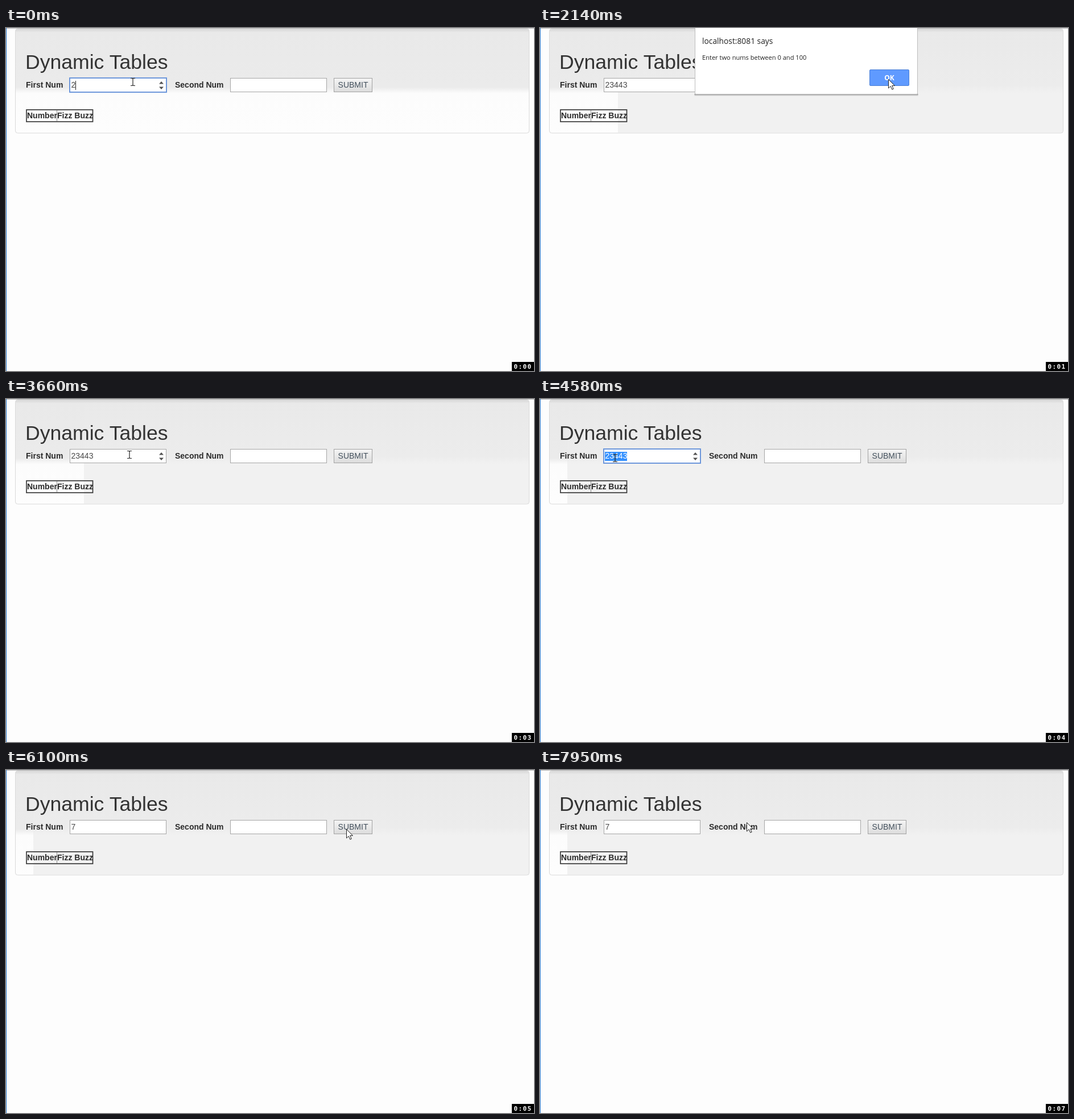
An HTML page for the animation above (8 s loop, 928 by 604 pixels).

```html
<!DOCTYPE html>
<html lang="en">
<head>
<meta charset="utf-8">
<title>Dynamic Tables</title>
<style>
  html, body { margin: 0; width: 100%; height: 100%; overflow: hidden; background: #fdfdfd; }
  svg { display: block; width: 928px; height: 604px; font-family: "Liberation Sans", Arial, sans-serif; font-size: 14px; }
  text { white-space: pre; }
  .bold { font-weight: 700; fill: #2b2b2b; }
  .field { fill: #fff; stroke: #a6a6a6; }
  .value { fill: #484848; }
  .spin { fill: #505050; }
  .dialog { font-family: "Open Sans", "Noto Sans", sans-serif; }
  .clock { font: 700 11px "DejaVu Sans Mono", monospace; letter-spacing: 1.4px; fill: #fff; }
</style>
</head>
<body>
<svg viewBox="0 0 928 604">
  <defs>
    <linearGradient id="light" gradientUnits="userSpaceOnUse" x1="0" y1="1" x2="0" y2="185">
      <stop offset="0" stop-color="#e9e9e9"/><stop offset=".56" stop-color="#ebebeb"/>
      <stop offset=".62" stop-color="#fcfcfc"/><stop offset="1" stop-color="#fdfdfd"/>
    </linearGradient>
    <linearGradient id="gray" gradientUnits="userSpaceOnUse" x1="0" y1="1" x2="0" y2="185">
      <stop offset="0" stop-color="#e9e9e9"/><stop offset=".54" stop-color="#ececec"/>
      <stop offset=".62" stop-color="#f1f1f1"/><stop offset="1" stop-color="#f1f1f1"/>
    </linearGradient>
    <linearGradient id="inset" x2="0" y2="1">
      <stop offset="0" stop-opacity=".07"/><stop offset="1" stop-opacity="0"/>
    </linearGradient>
    <linearGradient id="button" x2="0" y2="1">
      <stop offset="0" stop-color="#f5f5f5"/><stop offset="1" stop-color="#dcdcdc"/>
    </linearGradient>
    <linearGradient id="glow" x2="0" y2="1">
      <stop offset="0" stop-color="#fcfcfc" stop-opacity="0"/><stop offset=".45" stop-color="#fcfcfc"/>
    </linearGradient>
    <linearGradient id="shadow" x2="0" y2="1">
      <stop offset="0" stop-opacity=".45"/><stop offset="1" stop-opacity="0"/>
    </linearGradient>
    <path id="arrows" class="spin" d="M-4 98.500l4-4.500 4 4.500zM-4 103.500l4 4.500 4-4.500z"/>
  </defs>

  <rect width="928" height="604" fill="#fdfdfd"/>
  <rect x="16.500" y="1.500" width="903" height="183.500" rx="4" fill="url(#light)"/>
  <rect id="tint" y="2" height="182.500" fill="url(#gray)"/>
  <rect id="ghost" x="272" y="74" width="392" height="27" fill="url(#glow)"/>
  <rect x="17" y="2" width="902" height="6" fill="url(#inset)"/>
  <rect x="16.500" y="1.500" width="903" height="183.500" rx="4" fill="none" stroke="#dadada"/>
  <rect width="928" height="1" fill="#b4b4b4"/>
  <rect width="1" height="604" fill="#2b7cd3"/>

  <text x="34" y="72" font-size="35.600" fill="#333">Dynamic Tables</text>
  <text class="bold" x="35" y="105">First Num</text>
  <text class="bold" x="297" y="105">Second Num</text>

  <rect class="field" x="112.500" y="88.500" width="169" height="24"/>
  <rect id="focus" x="112" y="88" width="170" height="25" fill="none" stroke="#6d97db" stroke-width="2"/>
  <rect id="selection" x="114" y="93" width="39" height="16" fill="#3390ff"/>
  <text id="value" class="value" x="114.500" y="105"></text>
  <rect id="caret" y="93" width="1" height="16" fill="#222"/>
  <use id="spin1" href="#arrows" x="273"/>

  <rect class="field" x="394.500" y="88.500" width="169" height="24"/>
  <use id="spin2" href="#arrows" x="554"/>

  <rect x="576.500" y="88.500" width="67" height="24" fill="url(#button)" stroke="#a2a2a2"/>
  <text x="610" y="105" text-anchor="middle" fill="#43505c">SUBMIT</text>

  <rect x="36" y="144" width="116.500" height="21" fill="none" stroke="#3a3a3a" stroke-width="1.700"/>
  <path d="M89.500 145v19" stroke="#888"/>
  <text class="bold" x="37" y="159">Number</text>
  <text class="bold" x="90" y="159">Fizz Buzz</text>

  <g id="dialog" class="dialog">
    <rect x="271.500" y="116" width="393" height="4" fill="url(#shadow)"/>
    <path d="M272.500-30V115q0 1.500 1.500 1.500H662q1.500 0 1.500-1.500V-30z" fill="#fff" stroke="#bdbdbd"/>
    <text x="285" y="27.500" font-size="13.800" fill="#222">localhost:8081 says</text>
    <text x="285" y="56" font-size="11.100" fill="#222">Enter two nums between 0 and 100</text>
    <rect x="579.500" y="73.500" width="69" height="28" rx="1.500" fill="#5f9aff" stroke="#4a7fd6"/>
    <text x="614" y="91.500" font-size="12" font-weight="700" fill="#fff" text-anchor="middle">OK</text>
  </g>

  <rect x="889" y="588" width="39" height="16" fill="#000"/>
  <text id="clock" class="clock" x="892.500" y="600"></text>

  <path id="arrow" d="M.5.5V16l3.700-3.500 2.600 5.800 2.400-1.100-2.500-5.600H11.500z" fill="#fff" stroke="#222"/>
  <path id="beam" d="M-4-6.500h3l1 1 1-1h3M0-5.500v11M-4 6.500h3l1-1 1 1h3" fill="none" stroke="#222" stroke-width="1.200"/>
</svg>
<script>
const LOOP = 8000;
const TICK = 185;      // the clock turns this long after each full second
const KEY_GAP = 130;   // between key presses
const FADE = 150;

const el = id => document.getElementById(id);
const set = (id, attrs) => {
  for (const name in attrs) el(id).setAttribute(name, attrs[name]);
};
const show = (id, on) => set(id, { visibility: on ? "visible" : "hidden" });
const within = (v, from, to) => v >= from && v < to;
const clamp = (v, low, high) => Math.min(high, Math.max(low, v));
const ease = k => k * k * (3 - 2 * k);

// Each round: type a number, submit it, dismiss the alert.
const rounds = [
  { type: 0, text: "23443", open: 1340, close: 2450 },
  { type: 4590, text: "7", open: 6170, close: 7800 }
];
const drag = { from: 3750, to: 4020 };

const startPoint = { x: 223, y: 95 };
const moves = [
  { from: 680, to: 1190, x: 601, y: 105 },   // submit
  { from: 1340, to: 1900, x: 612, y: 90 },   // OK
  { from: 2290, to: 2450, x: 386, y: 95 },
  { from: 3050, to: 3640, x: 217, y: 98 },   // first field
  { ...drag, x: 48, y: 97 },
  { from: 4300, to: 5400, x: 565, y: 142 },
  { from: 5550, to: 5950, x: 598, y: 104 },  // submit
  { from: 6500, to: 7060, x: 632, y: 91 },   // OK
  { from: 7080, to: 7430, x: 606, y: 83 },
  { from: 7500, to: 7950, x: 363, y: 92 }
];

function pointerAt(t) {
  let { x, y } = startPoint;
  for (const move of moves) {
    const k = ease(clamp((t - move.from) / (move.to - move.from), 0, 1));
    x += (move.x - x) * k;
    y += (move.y - y) * k;
  }
  return [Math.round(x), Math.round(y)];
}

function draw(t) {
  const round = rounds.filter(r => r.type <= t).pop();
  const keys = 1 + Math.max(0, Math.floor((t - round.type - FADE) / KEY_GAP));
  const value = round.text.slice(0, keys);
  const alertOpen = within(t, round.open, round.close);
  const fading = within(t, round.close, round.close + FADE);

  const [x, y] = pointerAt(t);
  const overField = left => within(x, left, left + 170) && within(y, 88, 113);
  const overFirst = overField(112);
  const overSecond = overField(394);
  const dragging = within(t, drag.from, drag.to);
  const selected = within(t, drag.from + KEY_GAP, rounds[1].type);
  const focused = t < round.open - FADE || within(t, drag.from, rounds[1].type);
  const beam = !alertOpen && (overFirst || overSecond || dragging);

  // The shaded part of the panel changes with the clock.
  const seconds = Math.max(0, Math.floor((t - TICK) / 1000));
  const left = seconds < 4 ? 137 : 48;
  const right = seconds % 4 === 2 ? 269 : 919;
  set("tint", { x: left, width: seconds ? right - left : 0 });
  el("clock").textContent = "0:0" + seconds;

  el("value").textContent = value;
  el("value").style.fill = selected ? "#fff" : "";
  show("focus", focused);
  show("selection", selected);
  show("caret", focused && !selected);
  set("caret", { x: 114 + Math.round(value.length * 7.8) });
  show("spin1", focused || (overFirst && !alertOpen));
  show("spin2", (fading && round === rounds[0]) || (overSecond && !alertOpen));

  const dy = fading ? -15 : t < round.open + KEY_GAP ? -1 : 0;
  set("dialog", { transform: `translate(0 ${dy})`, opacity: alertOpen ? 1 : fading ? .18 : 0 });
  show("ghost", fading);

  show("arrow", !beam);
  show("beam", beam);
  set(beam ? "beam" : "arrow", { transform: `translate(${x} ${y})` });
}

function frame() {
  draw(performance.now() % LOOP);
  requestAnimationFrame(frame);
}
frame();
</script>
</body>
</html>
```
